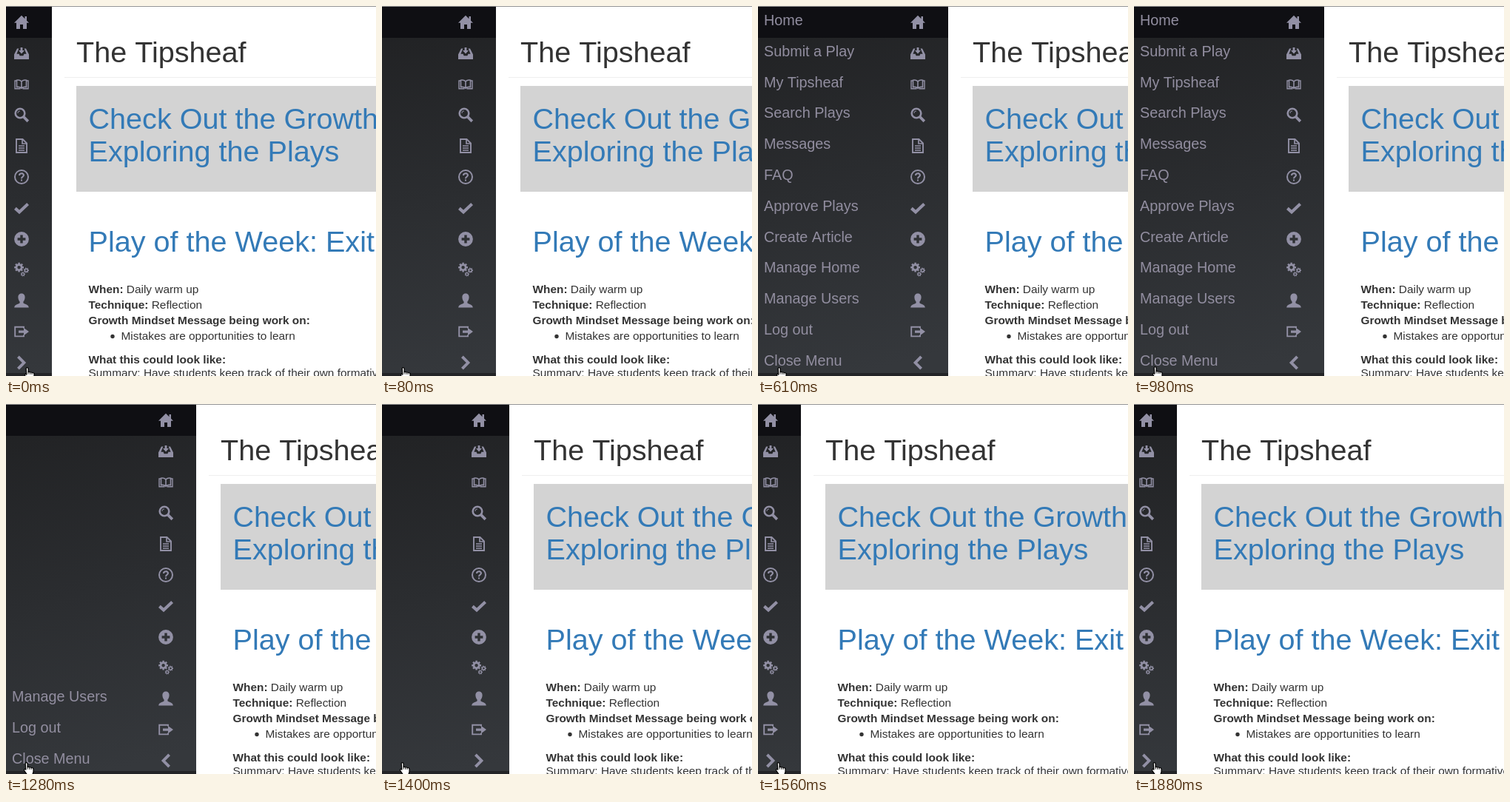
An HTML page with a canvas for the animation above (1.98 s loop, 500 by 500 pixels).

```html
<!DOCTYPE html>
<html lang="en">
<head>
<meta charset="utf-8">
<title>Sliding menu</title>
<style>
html, body { margin: 0; width: 100%; height: 100%; overflow: hidden; background: #fff; }
canvas { display: block; width: 500px; height: 500px; }
</style>
</head>
<body>
<canvas id="stage" width="500" height="500"></canvas>
<script>
const ctx = document.getElementById('stage').getContext('2d');
const LOOP = 1980, STEP = 40;
const CLOSED = 58, OPEN = 257, ROW = 41.8;
const SANS = '"Liberation Sans", Arial, sans-serif';
const INK = '#333333', LINK = '#337ab7', MENU = '#928ea0', ICON = '#9290a5';

const labels = ['Home', 'Submit a Play', 'My Tipsheaf', 'Search Plays', 'Messages', 'FAQ',
  'Approve Plays', 'Create Article', 'Manage Home', 'Manage Users', 'Log out', 'Close Menu'];

// Icon parts live in a 20 x 20 box; a width means stroke, none means fill.
const part = (d, width) => ({ path: new Path2D(d), width });
const ring = (x, y, r) => `M${x - r} ${y}a${r} ${r} 0 1 0 ${2 * r} 0a${r} ${r} 0 1 0 ${-2 * r} 0Z`;

function gear(x, y, r, teeth) {
  let d = '';
  for (let i = 0; i < teeth; i++) {
    const a = i / teeth * Math.PI * 2;
    const at = k => `${x + Math.cos(a) * r * k} ${y + Math.sin(a) * r * k}`;
    d += `M${at(0.7)}L${at(1)}`;
  }
  return [part(ring(x, y, r * 0.56), r * 0.42), part(d, r * 0.38)];
}

const icons = [
  [part('M10 .8L0 10.7H3V19H8V13H12V19H17V10.7H20L17 7.7V2H14.5V5.2Z')],
  [part('M4 3.5H6.4L3.4 10.8H6.6L7.6 13.2H12.4L13.4 10.8H16.6L13.6 3.5H16L20 11.4V18H0V11.4Z'),
   part('M8.6 2H11.4V6H14L10 10.5L6 6H8.6Z')],
  [part('M10 5.8C8 4 5.5 3.8 3.5 4.2V13.6C5.5 13.2 8 13.4 10 15.2C12 13.4 14.5 13.2 16.5 13.6V4.2C14.5 3.8 12 4 10 5.8V15', 1.6),
   part('M3.5 5H1V15.8H8.5M16.5 5H19V15.8H11.5', 1.4)],
  [part(ring(8, 8, 6.3), 2.6), part('M12.5 12.5L18.8 18.8', 3.8), part('M4.8 8A3.2 3.2 0 0 1 8 4.8', 1)],
  [part('M3 1H11.5L17 6.5V19H3Z', 1.9), part('M11 1V7H17', 1.7), part('M6 10H14M6 13H14M6 16H14', 1.4)],
  [part(ring(10, 10, 9), 2), part('M7 8C7 4.2 13 4.4 13 7.6C13 9.7 10 9.8 10 12.2', 2.1), part('M9 13.5h2v2.1h-2Z')],
  [part('M1.4 10.4L7 15.4L18.6 4.4', 4.1)],
  [part(ring(10, 10, 9.9) + 'M8.3 4.6H11.7V8.3H15.4V11.7H11.7V15.4H8.3V11.7H4.6V8.3H8.3Z')],
  [...gear(6.6, 7.2, 6.4, 8), ...gear(16.4, 11.2, 3.6, 7), ...gear(11.8, 16.4, 3.1, 7)],
  [part('M10 .5C13.4.5 14.8 3 14.6 6C14.4 9 13.2 10.6 12.4 11.6V13.2C13.2 14.6 19.6 15 19.8 19.4H.2C.4 15 6.8 14.6 7.6 13.2V11.6C6.8 10.6 5.6 9 5.4 6C5.2 3 6.6.5 10 .5Z')],
  [part('M13 5.6V3.8H1.2V16.4H13V14.6', 1.9), part('M6 8.4H13V5L20 10.1L13 15.2V11.8H6Z')],
];
const chevron = {
  right: [part('M5.4 1.8L13.4 10L5.4 18.2', 3.9)],
  left: [part('M14.6 1.8L6.6 10L14.6 18.2', 3.9)],
};

const hand = new Path2D('M2.2 1.6Q2.6.6 3.6.7Q4.9.8 5 2V6.6Q6.6 5.8 7.6 7Q9 6.3 10 7.6Q12.6 7 13 9.4V13L11.6 17.4H4.8L1 11.8Q.2 10.2 1 9.6Q2 9 2.8 10.2Z');

const swing = p => 0.5 - Math.cos(Math.max(0, Math.min(1, p)) * Math.PI) / 2;

function panelWidth(t) {
  const p = t < 1280 ? swing((t + 18) / 200) : 1 - swing((t - 1309) / 200);
  return Math.round(CLOSED + (OPEN - CLOSED) * p);
}

function box(x, y, w, h, color) {
  ctx.fillStyle = color;
  ctx.fillRect(x, y, w, h);
}

function write(str, x, y, size, color, bold) {
  ctx.font = `${bold ? 'bold ' : ''}${size}px ${SANS}`;
  ctx.fillStyle = color;
  ctx.fillText(str, x, y);
  return x + ctx.measureText(str).width;
}

function drawIcon(parts, x, y) {
  ctx.save();
  ctx.translate(x - 10, y - 10);
  ctx.fillStyle = ctx.strokeStyle = ICON;
  for (const { path, width } of parts) {
    if (width) {
      ctx.lineWidth = width;
      ctx.stroke(path);
    } else {
      ctx.fill(path, 'evenodd');
    }
  }
  ctx.restore();
}

function drawPage(x) {
  const left = x + 49.5, body = 15.4, head = 39.6;
  write('The Tipsheaf', x + 33, 76, head, INK);
  box(x + 17, 96, 500, 1, '#eeeeee');
  box(x + 33, 108, 500, 143, '#d3d3d3');
  write('Check Out the Growth', left, 166, head, LINK);
  write('Exploring the Plays', left, 210, head, LINK);
  write('Play of the Week: Exit', left, 332, head, LINK);

  write(' Daily warm up', write('When:', left, 388, body, INK, true), 388, body, INK);
  write(' Reflection', write('Technique:', left, 409, body, INK, true), 409, body, INK);
  write('Growth Mindset Message being work on:', left, 430, body, INK, true);
  ctx.beginPath();
  ctx.arc(x + 82, 446.5, 2.7, 0, Math.PI * 2);
  ctx.fill();
  write('Mistakes are opportunities to learn', left + 44, 451, body, INK);
  write('What this could look like:', left, 483, body, INK, true);
  write('Summary: Have students keep track of their own formative', left, 501, body, INK);
}

function drawMenu(w, t) {
  const shade = ctx.createLinearGradient(0, 30, w * 0.5, 500);
  shade.addColorStop(0, '#212224');
  shade.addColorStop(1, '#35383c');
  box(0, 0, w, 500, shade);
  box(0, 1, w, 42, '#0f0f13');
  box(0, 496, w, 4, '#232427');

  const open = t >= 200 && t < 1320;
  const firstLabel = t >= 1280 ? 9 : 0;
  labels.forEach((label, i) => {
    const y = Math.round(22 + ROW * i);
    if (open && i >= firstLabel) write(label, 8, y + 4, 19.8, MENU);
    drawIcon(icons[i] || chevron[open ? 'left' : 'right'], w - 41, y);
  });
}

function drawCursor(t) {
  const moved = t < 980 ? 0 : Math.min(3, Math.floor((t - 980) / STEP) + 1) / 3;
  ctx.save();
  ctx.translate(Math.round(25 - moved), Math.round(488 - 4 * moved));
  ctx.fillStyle = '#ffffff';
  ctx.strokeStyle = '#000000';
  ctx.lineWidth = 1.2;
  ctx.lineJoin = 'round';
  ctx.fill(hand);
  ctx.stroke(hand);
  ctx.lineWidth = 0.9;
  ctx.stroke(new Path2D('M5 6.6V9.6M7.6 7V9.8M10 7.6V10'));
  ctx.restore();
}

function draw(ms) {
  const t = ms % LOOP;
  const tick = Math.floor(t / STEP) * STEP;
  const w = panelWidth(tick);
  box(0, 0, 500, 500, '#ffffff');
  drawPage(w);
  drawMenu(w, tick);
  box(0, 0, 500, 1, '#949494');
  drawCursor(t);
}

const start = performance.now();
function loop() {
  draw(performance.now() - start);
  requestAnimationFrame(loop);
}
loop();
</script>
</body>
</html>
```
